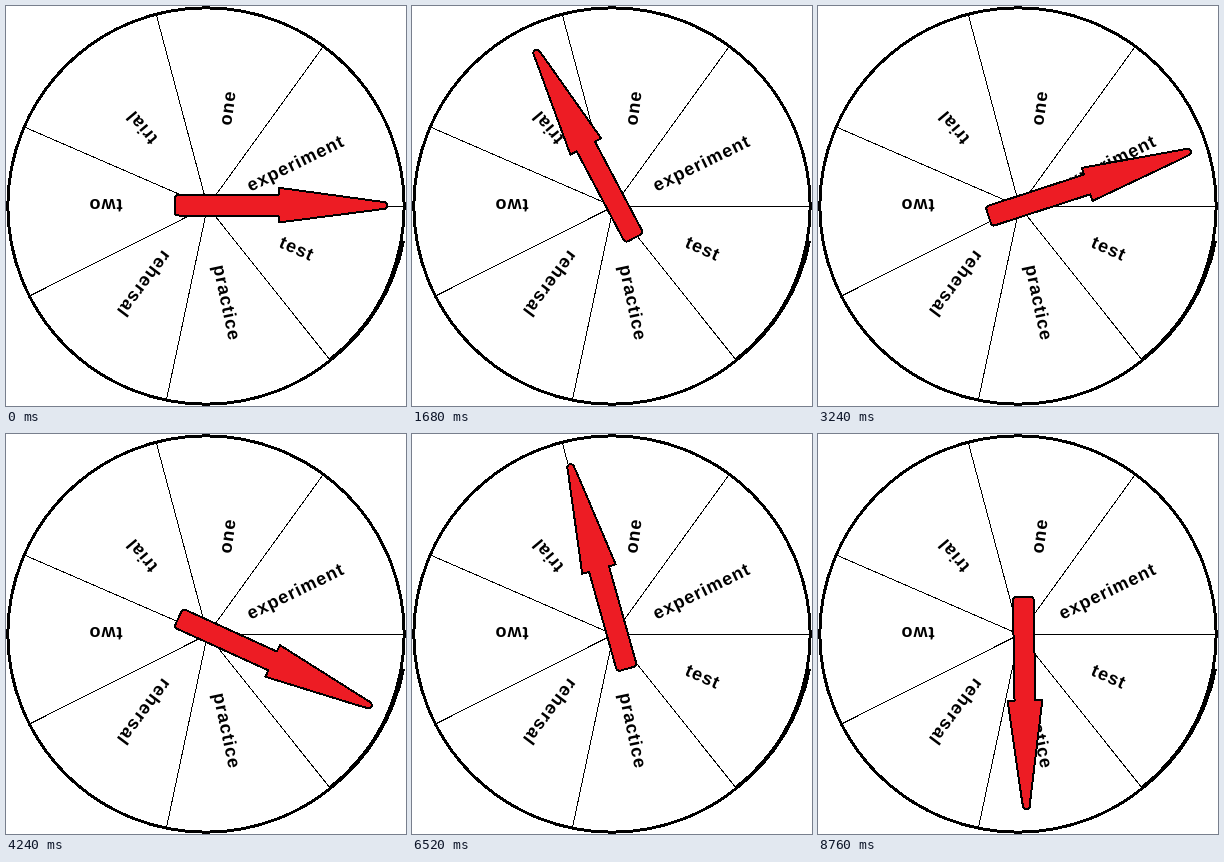
Write an HTML page that moves like this. It is 400 by 400 pixels and loops after 9.78 s.

```html
<!DOCTYPE html>
<html lang="en">
<head>
<meta charset="utf-8">
<title>Spinner</title>
<style>
  html, body { margin: 0; width: 100%; height: 100%; overflow: hidden; background: #fff; }
  svg { display: block; width: 100%; height: 100%; shape-rendering: crispEdges; }
  text { font: bold 18px "Liberation Sans", Arial, sans-serif; letter-spacing: 1px; text-anchor: middle; }
</style>
</head>
<body>
<svg viewBox="0 0 400 400">
  <g fill="none" stroke="#000">
    <circle cx="200" cy="200" r="198.2" stroke-width="3"/>
    <path d="M397 235A199 199 0 0 1 324 354" stroke-width="4"/>
    <path id="spokes" transform="translate(.5 .5)"/>
  </g>
  <g id="labels"></g>
  <path id="arrow" fill="#ed1c24" stroke="#000" stroke-width="2" stroke-linejoin="round"
    d="M-33 -10.7H67V-17.8L166 -4.3L174 -3.3Q178 0 174 3L166 4.3L67 17V10H-33Q-36.5 10 -36.5 7V-7Q-36.5 -10.7 -33 -10.7Z"/>
</svg>
<script>
const STEP = 40, LAST_STEP = 219, LOOP = 9780;
const PIVOT = "205.5 199.5";

const rim = [[398, 200], [316, 41], [150, 9], [19, 121], [24, 289], [160, 393], [324, 354]];
document.getElementById("spokes").setAttribute("d", rim.map(([x, y]) => `M201 200L${x} ${y}`).join(""));

// word, centre x, centre y, rotation
const labels = [
  ["experiment", 290, 158, -26],
  ["test", 290.5, 243.5, 24],
  ["practice", 220, 297, 78],
  ["rehersal", 137, 277.5, 127],
  ["two", 99.5, 198, 180],
  ["trial", 136.5, 121, -130],
  ["one", 222.5, 102, -82]
];
document.getElementById("labels").innerHTML = labels.map(([word, x, y, angle]) =>
  `<text transform="translate(${x} ${y}) rotate(${angle})" y="5">${word}</text>`).join("");

// Starts at 22 degrees per step and loses 0.1 degrees each step.
function angleAt(step) {
  return 22 * step - 0.05 * step * (step - 1);
}

const arrow = document.getElementById("arrow");
function draw() {
  const step = Math.min(LAST_STEP, Math.floor(performance.now() % LOOP / STEP));
  arrow.setAttribute("transform", `translate(${PIVOT}) rotate(${-angleAt(step)})`);
  requestAnimationFrame(draw);
}
draw();
</script>
</body>
</html>
```
